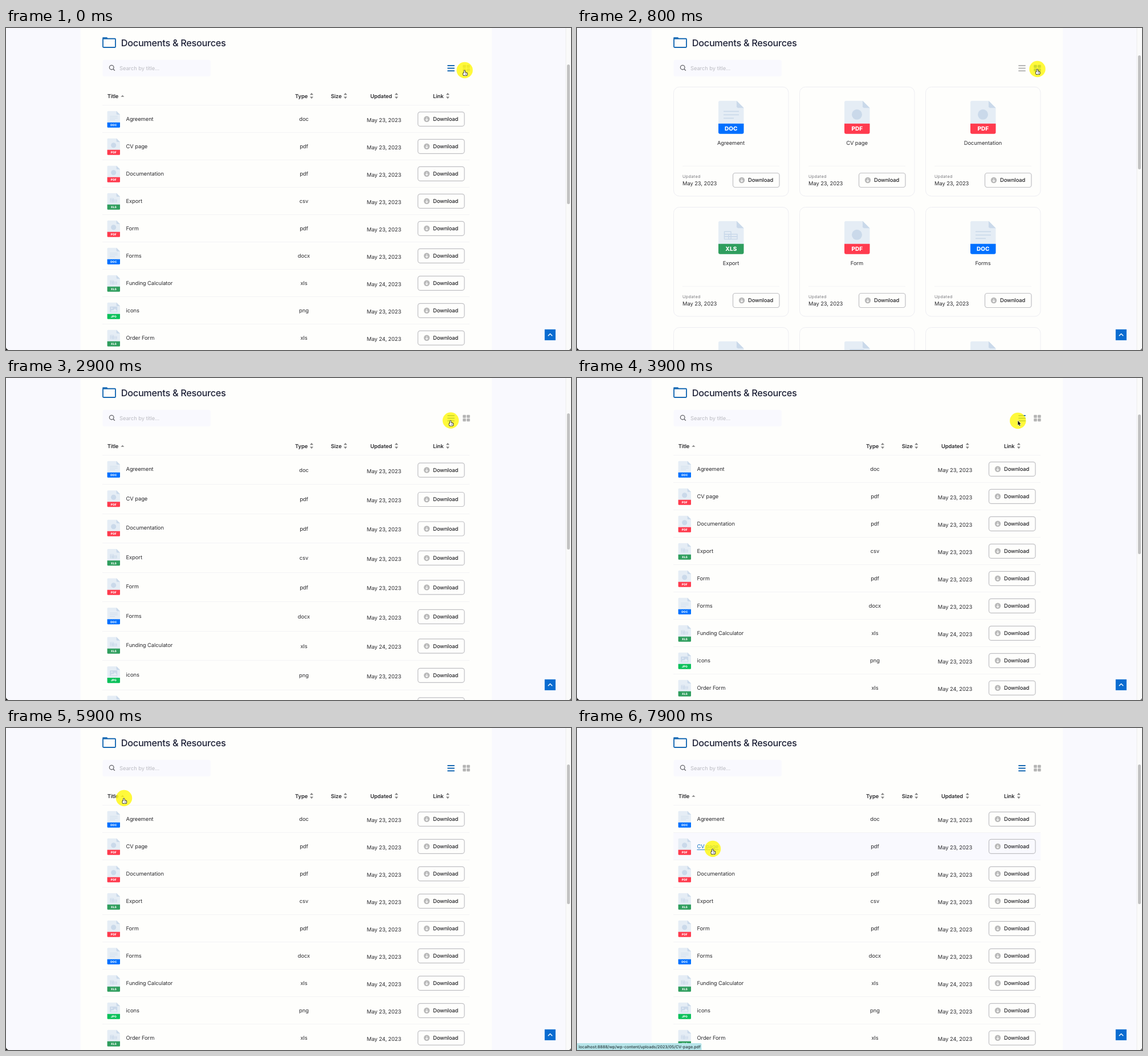
These frames come from a looping animation (991x565 px, 8 s). An HTML page with a canvas:

```html
<!DOCTYPE html>
<html lang="en">
<head>
<meta charset="utf-8">
<title>Documents &amp; Resources</title>
<style>
  html, body { margin: 0; width: 100%; height: 100%; overflow: hidden; background: #fefefc; }
  canvas { display: block; width: 991px; height: 565px; }
</style>
</head>
<body>
<canvas id="stage" width="991" height="565"></canvas>
<script>
const ctx = document.getElementById('stage').getContext('2d');
const W = 991, H = 565, LOOP = 8000;
const PAGE = '#fefefc', TINT = '#f9f9fe', RULE = '#f3f3f5', INK = '#2a2a2e';
const BLUE = '#1769b3', GREY = '#b5b5b5', ARROW = '#858585';
const LEAF = '#e5edf5', MARK = '#cad9ea';

const BADGE = {
  DOC: '#0070ff', PDF: '#ff3b4e', XLS: '#2f9e5e',
  JPG: '#0bc15b', MP4: '#ee353c', WAV: '#9333fb'
};
const KIND = {
  doc: 'DOC', docx: 'DOC', pdf: 'PDF', csv: 'XLS', xls: 'XLS',
  png: 'JPG', webp: 'JPG', mp3: 'WAV', mp4: 'MP4'
};
const files = [
  'Agreement.doc', 'CV page.pdf', 'Documentation.pdf', 'Export.csv', 'Form.pdf', 'Forms.docx',
  'Funding Calculator.xls', 'icons.png', 'Order Form.xls', 'Packing slip.webp', 'Path.pdf',
  'Product Quote.xls', 'products.csv', 'Sound.mp3', 'Storage.xls', 'Video.mp4'
].map(s => {
  const [name, type] = s.split('.');
  const day = type === 'xls' || type === 'webp' ? 24 : 23;
  return { name, type, date: `May ${day}, 2023` };
});
const reversed = [...files].reverse();

const clamp = k => Math.max(0, Math.min(1, k));
const ease = k => k < 0.5 ? 4 * k ** 3 : 1 - 4 * (1 - k) ** 3;

const moves = [
  { from: 0, to: 200, x: 807.5, y: 72 },
  { from: 1900, to: 2400, x: 780, y: 74.5 },
  { from: 3800, to: 4500, x: 207, y: 123 },
  { from: 6600, to: 7160, x: 243, y: 218 },
  { from: 7300, to: 7700, x: 238, y: 212 }
];

function pointerAt(t) {
  const at = { x: 804.5, y: 74 };
  for (const m of moves) {
    const k = ease(clamp((t - m.from) / (m.to - m.from)));
    at.x += (m.x - at.x) * k;
    at.y += (m.y - at.y) * k;
  }
  return at;
}

function text(s, x, y, o = {}) {
  const { size = 9.4, weight = 400, color = INK, align = 'left', gap = -0.08 } = o;
  ctx.font = `${weight} ${size}px Inter, "Noto Sans", sans-serif`;
  ctx.letterSpacing = gap + 'px';
  ctx.textAlign = align;
  ctx.fillStyle = color;
  ctx.fillText(s, x, y);
}

function rect(x, y, w, h, color) {
  ctx.fillStyle = color;
  ctx.fillRect(x, y, w, h);
}

function box(x, y, w, h, r, fill, edge, line = 1) {
  ctx.beginPath();
  ctx.roundRect(x, y, w, h, r);
  if (fill) { ctx.fillStyle = fill; ctx.fill(); }
  if (edge) { ctx.strokeStyle = edge; ctx.lineWidth = line; ctx.stroke(); }
}

function trace(pts, close) {
  ctx.beginPath();
  for (const [x, y] of pts) ctx.lineTo(x, y);
  if (close) ctx.closePath();
}

function poly(color, ...pts) {
  trace(pts, true);
  ctx.fillStyle = color;
  ctx.fill();
}

function stroke(color, width, ...pts) {
  trace(pts);
  ctx.strokeStyle = color;
  ctx.lineWidth = width;
  ctx.stroke();
}

function disc(x, y, r, color) {
  ctx.beginPath();
  ctx.arc(x, y, r, 0, 7);
  ctx.fillStyle = color;
  ctx.fill();
}

// Triangle with its base at y; a negative h points up
function caret(x, y, h) {
  poly(ARROW, [x - 3, y], [x, y + h], [x + 3, y]);
}

const glyphs = {
  DOC() {
    for (let i = 0; i < 3; i++) rect(9, 17.7 + i * 6, i < 2 ? 27 : 18, 1.7, MARK);
  },
  PDF() { disc(22, 24, 9, MARK); },
  XLS() {
    for (let i = 0; i < 3; i++) {
      box(10.5, 18.5 + i * 4.4, 11.5, 4.4, 0, null, MARK, 1.5);
      if (i) box(18, 18.5 + i * 4.4, 15, 4.4, 0, null, MARK, 1.5);
    }
  },
  JPG() {
    box(9, 14, 26, 20, 2, MARK);
    disc(16, 20, 2.5, LEAF);
    poly(LEAF, [11, 32], [17, 26], [20, 28], [27, 21], [33, 28], [33, 32]);
  },
  MP4() {
    disc(22, 22, 12, MARK);
    poly(LEAF, [18.5, 16], [28, 22], [18.5, 28]);
  },
  WAV() {
    for (let i = 0; i < 9; i++) {
      const h = 3 + 12 * Math.sin(i * 0.8) ** 2;
      rect(9 + i * 3.1, 25 - h / 2, 1.7, h, MARK);
    }
    rect(8, 24.3, 28, 1.4, MARK);
  }
};

function fileIcon(x, y, scale, type) {
  const kind = KIND[type];
  ctx.save();
  ctx.translate(x, y);
  ctx.scale(scale, scale);
  box(0, 0, 36, 45, [3, 0, 0, 0], LEAF);
  poly(PAGE, [32, 0], [37, 0], [37, 5]);
  poly(LEAF, [32, 0], [44.5, 12.5], [44.5, 45], [32, 45]);
  poly(MARK, [32, 0], [32, 10.5], [34, 12.5], [44.5, 12.5]);
  glyphs[kind]();
  box(0, 40, 44.5, 18, [0, 0, 3, 3], BADGE[kind]);
  text(kind, 22.3, 52.6, { size: 10, weight: 800, color: '#fff', align: 'center', gap: 0.05 });
  ctx.restore();
}

function button(x, cy) {
  box(x + 0.5, cy - 12.5, 81.5, 25, 4, null, '#bfbfc3', 1.2);
  ctx.save();
  ctx.translate(x + 16, cy);
  disc(0, 0, 5.2, '#b9b9b9');
  stroke('#fff', 1.1, [0, -2.7], [0, 2.4]);
  stroke('#fff', 1.1, [-2.1, 0.5], [0, 2.6], [2.1, 0.5]);
  ctx.restore();
  text('Download', x + 27, cy + 3.4, { weight: 500, color: '#222226' });
}

function heading(label, x, arrow) {
  text(label, x, 122.5, { weight: 600 });
  if (!arrow) return;
  caret(arrow, 117.4, -3.6);
  caret(arrow, 120.6, 3.6);
}

function table(rows, rowH, desc, hover, link) {
  heading('Title', 177.7);
  caret(204.4, desc ? 117.7 : 120.7, desc ? 3 : -3);
  heading('Type', 507, 536);
  heading('Size', 569.7, 595.3);
  heading('Updated', 639, 684.8);
  heading('Link', 749, 774.8);
  rect(169, 135, 644, 1, RULE);
  rows.forEach((f, i) => {
    const top = 135.5 + i * rowH, mid = top + rowH / 2 + 0.3;
    if (top > H) return;
    if (i === hover) rect(169, top + 0.5, 644, rowH - 1, TINT);
    rect(169, Math.round(top + rowH - 0.5), 644, 1, RULE);
    fileIcon(177.6, top + 10.2, 0.503, f.type);
    const active = link && link.row === i;
    text(f.name, 210.5, top + 27.9, { color: active ? link.color : INK });
    if (active && link.line) rect(210.5, top + 29.7, ctx.measureText(f.name).width, 0.9, link.color);
    text(f.type, 522.5, mid + 3.4, { align: 'center' });
    text(f.date, 663, mid + 5, { align: 'center' });
    button(722, mid);
  });
}

function cards() {
  files.slice(0, 9).forEach((f, i) => {
    const x = 169 + (i % 3) * 221, y = 103.5 + Math.floor(i / 3) * 211;
    box(x + 0.5, y, 201.5, 191.5, 10, null, '#ededf2');
    fileIcon(x + 79, y + 24.3, 1, f.type);
    text(f.name, x + 101, y + 101.2, { align: 'center' });
    rect(x + 16, y + 138.2, 170, 1, '#f4f4f6');
    text('Updated', x + 16, y + 159.4, { size: 7.2, color: '#77777c', gap: 0.4 });
    text(f.date, x + 16, y + 172.4);
    button(x + 104, y + 163.5);
  });
}

function header(grid) {
  rect(0, 0, W, H, TINT);
  rect(131, 0, 721, H, PAGE);

  box(170, 18.8, 22, 15.2, 1.2, null, BLUE, 1.9);
  poly(BLUE, [169, 19], [169.5, 16.3], [177, 16.3], [179.5, 19]);
  text('Documents & Resources', 201.8, 32.4, { size: 16.3, weight: 500, color: '#1f2238', gap: -0.3 });

  box(169.5, 56, 189.5, 29, 4, TINT);
  box(181.4, 65.4, 7.6, 7.6, 3.8, null, '#66666a', 1.3);
  stroke('#66666a', 1.4, [188, 72], [190.8, 74.8]);
  text('Search by title...', 199, 74, { color: '#bcbcc2' });

  for (let i = 0; i < 3; i++) rect(774.3, 65 + i * 4.6, 12.4, 2, grid ? GREY : BLUE);
  for (let i = 0; i < 4; i++) {
    box(801.2 + (i % 2) * 6.9, 64.8 + (i >> 1) * 6.3, 5.6, 5.1, 1, grid ? BLUE : GREY);
  }
}

function overlay(top, bottom) {
  rect(944.8, 528.8, 19.1, 19.1, '#0a6cd0');
  stroke('#fff', 1.4, [950.8, 540.2], [954.5, 536.6], [958.2, 540.2]);
  rect(982, 0, 9, H, '#fafafa');
  rect(981.5, 0, 1, H, '#ececec');
  box(984, top, 5, bottom - top, 2.5, '#c2c2c2');
  poly('#111', [0, 560.5], [1, 563], [4, H], [0, H]);
  poly('#777', [W, 562], [W - 3, H], [W, H]);
}

function status(alpha) {
  ctx.globalAlpha = alpha;
  box(0, 553, 218.5, 12, [0, 2, 0, 0], '#b7e5ea');
  text('localhost:8888/wp/wp-content/uploads/2023/05/CV-page.pdf', 3, 562.2,
    { size: 7.1, weight: 500, color: '#26363a', gap: 0 });
  ctx.globalAlpha = 1;
}

function pointer({ x, y }, hand) {
  disc(x, y, 14.2, 'rgba(255,248,10,.8)');
  ctx.save();
  ctx.translate(x, y);
  if (hand) {
    // Outline first, then the fill, so finger and palm merge
    for (const edge of ['#222', null]) {
      box(-1, 0.6, 1.6, 7, 0.8, '#fff', edge, 1.6);
      box(-2.6, 4.4, 7, 4.8, 2, '#fff', edge, 1.6);
    }
    for (const fx of [1.2, 2.8]) stroke('#333', 0.6, [fx, 6], [fx, 8]);
  } else {
    trace([[0, 0], [0, 7.6], [1.7, 6.1], [2.9, 9], [4.2, 8.4], [3, 5.7], [5.2, 5.5]], true);
    ctx.strokeStyle = 'rgba(255,255,255,.8)';
    ctx.lineWidth = 1.3;
    ctx.stroke();
    ctx.fillStyle = '#111';
    ctx.fill();
  }
  ctx.restore();
}

function linkAt(t) {
  if (t >= 7600) return { row: 1, color: '#0d70c0', line: true };
  if (t >= 6800 && t < 7000) return { row: 0, color: '#2c4c6e' };
}

function draw(now) {
  // The screen advances in steps of 100 ms
  const t = Math.floor((now % LOOP) / 100) * 100;
  const grid = t >= 600 && t < 2900;
  const desc = t >= 4500 && t < 5900;
  const settle = grid ? 0 : clamp((3100 - t) / 200) ** 2 * (t >= 2900);
  const at = pointerAt(t);

  header(grid);
  if (grid) {
    ctx.globalAlpha = clamp(0.35 + (t - 600) / 300);
    cards();
    ctx.globalAlpha = 1;
    overlay(48, 248);
  } else {
    const hover = Math.floor((at.y - 135.5) / 48);
    table(desc ? reversed : files, 48 + 3.47 * settle, desc, hover, linkAt(t));
    overlay(64 - 2 * settle, 309 - 8 * settle);
  }
  status(clamp((t - 7600) / 250));
  const arrow = (t >= 3900 && t < 4400) || (t >= 6700 && t < 7600);
  pointer(at, !arrow);
}

ctx.textRendering = 'geometricPrecision';
ctx.lineJoin = 'round';
const start = performance.now();
function tick() {
  draw(performance.now() - start);
  requestAnimationFrame(tick);
}
tick();
</script>
</body>
</html>
```
